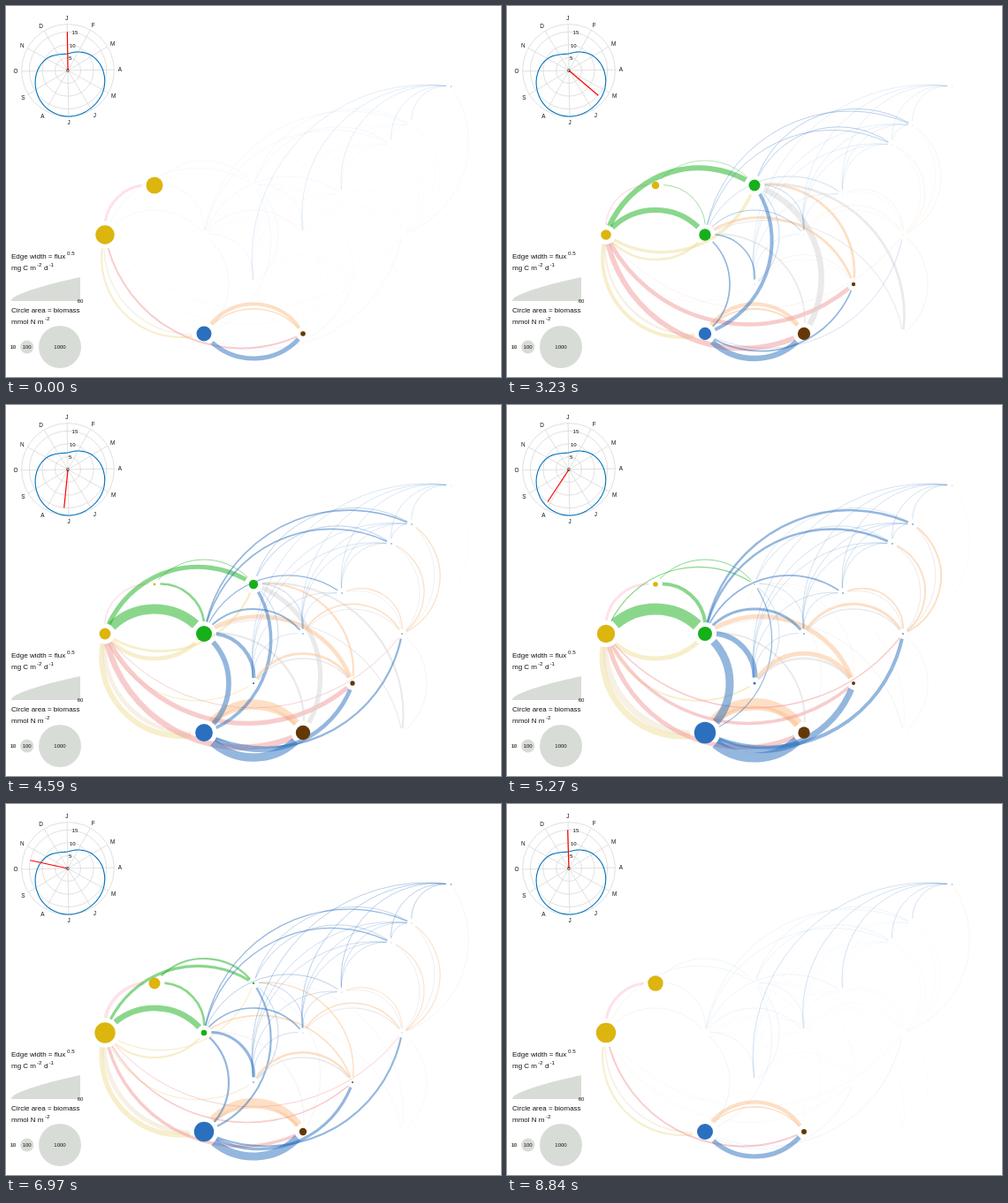
Animation of 560 by 420 pixels, one loop 9.01 s. Source, as an HTML page with a canvas:

```html
<!DOCTYPE html>
<html lang="en">
<head>
<meta charset="utf-8">
<title>Seasonal plankton food web</title>
<style>
  html, body { margin: 0; width: 100%; height: 100%; overflow: hidden; background: #fff; }
  canvas { display: block; width: 560px; height: 420px; }
</style>
</head>
<body>
<canvas id="stage" width="560" height="420"></canvas>
<script>
const ctx = document.getElementById('stage').getContext('2d');
const STEP = 170, WEEKS = 53;
const KEYS = [0, 11, 23, 31, 37, 45, 52]; // weeks at which sizes are given
const COLORS = {
  blue: '#2b70be', green: '#16b01a', peach: '#fbc08c', yellow: '#efdd98', red: '#f29a9a',
  pink: '#ffc4d8', grey: '#d6d6d6', beige: '#efe2cc'
};
const GOLD = '#dcb50f', GREEN = '#16b01a', BLUE = '#2b70be', BROWN = '#643806';

// id: x, y, colour, radius at each key week
const TINY = [0, 0, .5, .8, .7, .1, 0];
const nodes = {
  A: [168, 203, GOLD, [9.5, 13, 0, 2.8, 5.5, 7.5, 8.7]],
  B: [112, 259, GOLD, [10.7, 12, 2.7, 10.2, 11.8, 11.6, 11.2]],
  C: [224, 259, GREEN, [0, 0, 10, 8, 6.3, .3, 0]],
  D: [280, 203, GREEN, [0, 0, 9.7, .6, 2.3, 0, 0]],
  E: [224, 371, BLUE, [8.5, 6.3, 7.6, 12.2, 12, 10.5, 9]],
  F: [336, 371, BROWN, [2.8, 2, 9.7, 6.7, 4.6, 3.8, 3]],
  G: [280, 315, BLUE, [0, 0, .7, 1.5, 1.4, .2, 0]],
  H: [392, 315, BROWN, [0, 0, 3.3, 2, 1.6, .2, 0]],
  I: [336, 259, BLUE, TINY],
  J: [448, 259, BROWN, TINY],
  K: [380, 213, BLUE, TINY],
  L: [436, 157, BLUE, TINY],
  M: [459, 135, BLUE, TINY],
  N: [503.5, 91, BLUE, [.5, .3, .3, .4, .7, .7, .6]],
  O: [448, 371, BROWN, [0, 0, 0, 0, 0, 0, 0]]
};

// ends, colour, bend, width at each key week
const edges = [
  ['AB', 'pink', .25, [3, 4.5, 0, 3, 4, 3.5, 3]],
  ['BE', 'yellow', .3, [2, 1.8, 5, 7, 7, 4, 2]],
  ['BE', 'beige', .25, [1.5, 1.2, 3, 7, 7, 3, 1.6]],
  ['BF', 'red', .25, [2, 1.5, 8, 5, 4, 3, 2]],
  ['FE', 'peach', .3, [4, 2.5, 5, 11, 10, 7, 4.2]],
  ['FE', 'peach', .25, [1.5, 1.3, 2.5, 5, 4, 2.5, 1.5]],
  ['EF', 'blue', .25, [5, 3.2, 8, 11, 10, 8, 5.2]],
  ['JN', 'beige', .25, [.5, .15, .2, .3, .6, .7, .6]]
];
const addSeasonal = (ends, color, bend, summer) =>
  edges.push([ends, color, bend, [.1, .15, ...summer, .35, .15]]);

// edges that matter only in summer: widths in June, August, September
[
  ['CB', 'green', 9, 13, 13], ['DB', 'green', 9, 1.2, 6],
  ['CA', 'green', 1.2, 4, 5], ['DA', 'green', .9, 1, 4],
  ['BC', 'yellow', 4, 5, 4], ['BD', 'yellow', 5, .3, 2], ['BG', 'yellow', .3, 2, 2],
  ['BH', 'red', 7, 3.5, 3], ['BJ', 'red', .3, 1.5, 1.5],
  ['FD', 'grey', 10, .4, .7], ['FC', 'grey', 2.5, 2, 1],
  ['OD', 'grey', 4, .3, .3], ['OC', 'grey', 1.5, .6, .3], ['OJ', 'grey', .8, .4, .3],
  ['HC', 'peach', 4, 5, 3], ['HD', 'peach', 4, .3, 2.5],
  ['EC', 'blue', 2.5, 9, 4], ['ED', 'blue', 6, 1.2, 4],
  ['GC', 'blue', 2, 6, 6], ['GD', 'blue', .7, .4, .8],
  ['IC', 'blue', 1, 3, 3], ['ID', 'blue', .8, .4, .8],
  ['KC', 'blue', .6, 1.8, 1], ['LC', 'blue', .9, 2.5, 2.2], ['MC', 'blue', .9, 2.5, 2.2],
  ['LD', 'blue', .9, .4, .8], ['MD', 'blue', .9, .3, .8],
  ['EH', 'blue', 2.5, 7, 6], ['EJ', 'blue', .5, 4, 4]
].forEach(([ends, color, ...summer]) => addSeasonal(ends, color, .25, summer));

[['HG', 5], ['JI', 3], ['JK', 1.8], ['JL', 2], ['JM', 2]].forEach(([ends, w]) => {
  addSeasonal(ends, 'peach', .3, [.5, w, w * .9]);
  addSeasonal(ends, 'grey', .25, [.4, w * .5, w * .6]);
});

// hairlines from each larger grazer to the smaller ones
const grazers = 'GIKLMN';
for (let i = 1; i < grazers.length; i++) {
  for (let j = 0; j < i; j++) {
    const widths = grazers[i] === 'N' ? [.25, .1, .3, .4, .75, .55, .4] : [.04, .04, .3, .4, .7, .2, .06];
    edges.push([grazers[i] + grazers[j], 'blue', .25, widths]);
  }
}

function at(values, week) {
  let i = 0;
  while (i < KEYS.length - 2 && week > KEYS[i + 1]) i++;
  const f = (week - KEYS[i]) / (KEYS[i + 1] - KEYS[i]);
  return values[i] + (values[i + 1] - values[i]) * f;
}

function disc(x, y, r, color) {
  ctx.fillStyle = color;
  ctx.beginPath();
  ctx.arc(x, y, r, 0, 2 * Math.PI);
  ctx.fill();
}

function line(points, color, width, close) {
  ctx.strokeStyle = color;
  ctx.lineWidth = width;
  ctx.beginPath();
  points.forEach(p => ctx.lineTo(p[0], p[1]));
  if (close) ctx.closePath();
  ctx.stroke();
}

function text(str, x, y, size, align = 'left') {
  ctx.font = size + 'px "Liberation Sans", Arial, sans-serif';
  ctx.textAlign = align;
  ctx.fillStyle = '#111';
  ctx.fillText(str, x, y);
}

// Circular arc bulging to the right of its direction, trimmed near both nodes
function drawEdge([ends, color, bend, widths], week) {
  const width = at(widths, week);
  if (width < .03) return;
  const [x1, y1, , r1] = nodes[ends[0]], [x2, y2, , r2] = nodes[ends[1]];
  const dx = x2 - x1, dy = y2 - y1, len = Math.hypot(dx, dy);
  const radius = len * (bend * bend + .25) / (2 * bend);
  const back = bend - radius / len;
  const cx = (x1 + x2) / 2 - dy * back, cy = (y1 + y2) / 2 + dx * back;
  const gap = r => (at(r, week) + 5) / radius;
  const from = Math.atan2(y1 - cy, x1 - cx) - gap(r1);
  const to = Math.atan2(y2 - cy, x2 - cx) + gap(r2);
  ctx.globalAlpha = .5;
  ctx.strokeStyle = COLORS[color];
  ctx.lineWidth = width;
  ctx.beginPath();
  ctx.arc(cx, cy, radius, from, to, true);
  ctx.stroke();
  ctx.globalAlpha = 1;
}

const DIAL = [70, 73], UNIT = 2.91;
const polar = (deg, r) => {
  const a = (deg - 1) * Math.PI / 180;
  return [DIAL[0] + r * Math.sin(a), DIAL[1] - r * Math.cos(a)];
};

// monthly radii of the dial curve, joined by a periodic spline
const monthly = [19, 24, 32, 39.5, 46, 50, 52, 49, 42, 34.5, 27.5, 21];
const yearCurve = Array.from({ length: 120 }, (_, i) => {
  const m = Math.floor(i / 10), f = i / 10 - m;
  const [a, b, c, d] = [11, 0, 1, 2].map(k => monthly[(m + k) % 12]);
  const r = b + f / 2 * (c - a + f * (2 * a - 5 * b + 4 * c - d + f * (3 * (b - c) + d - a)));
  return polar(i * 3, r);
});

function drawDial(week) {
  for (const value of [5, 10, 15, 18]) {
    ctx.strokeStyle = '#d9d9d9';
    ctx.lineWidth = .8;
    ctx.beginPath();
    ctx.arc(...DIAL, value * UNIT, 0, 2 * Math.PI);
    ctx.stroke();
  }
  [...'JFMAMJJASOND'].forEach((month, i) => {
    line([DIAL, polar(i * 30, 18 * UNIT)], '#d9d9d9', .8);
    const [x, y] = polar(i * 30, 59);
    text(month, x, y + 2.3, 6.4, 'center');
  });
  line(yearCurve, '#0072bd', 1.1, true);
  line([DIAL, polar(week * 7 / 365 * 360 + .2, 15 * UNIT)], '#f00', 1.2);
  for (const value of [0, 5, 10, 15]) {
    const [x, y] = polar(11.5, value * UNIT);
    text(value, x, y + 2.2, 6, 'center');
  }
}

function drawLegend() {
  const shade = '#d8dcd6';
  text('Edge width = flux', 6, 286, 8);
  text('0.5', 69, 282, 6.2);
  text('mg C m', 6, 299, 8);
  text('-2', 35, 295, 6.2);
  text('d', 43, 299, 8);
  text('-1', 48.5, 295, 6.2);
  ctx.fillStyle = shade;
  ctx.beginPath();
  ctx.moveTo(84, 334);
  ctx.lineTo(6, 334);
  for (let x = 0; x <= 78; x += 2) ctx.lineTo(6 + x, 333 - 26 * Math.sqrt(x / 78) ** 1.3);
  ctx.fill();
  text('60', 84, 336, 6, 'center');
  text('Circle area = biomass', 6, 347, 8);
  text('mmol N m', 6, 360, 8);
  text('-2', 44, 356, 6.2);
  [[8, 10], [23.7, 100], [61, 1000]].forEach(([x, amount]) => {
    disc(x, 386, 24 * Math.sqrt(amount / 1000), shade);
    text(amount, x, 388.2, 6, 'center');
  });
}

function draw(now) {
  const week = Math.floor(now / STEP) % WEEKS;
  ctx.fillStyle = '#fff';
  ctx.fillRect(0, 0, 560, 420);
  edges.forEach(edge => drawEdge(edge, week));
  for (const [x, y, color, radii] of Object.values(nodes)) disc(x, y, at(radii, week), color);
  drawDial(week);
  drawLegend();
  requestAnimationFrame(() => draw(performance.now()));
}
draw(0);
</script>
</body>
</html>
```
